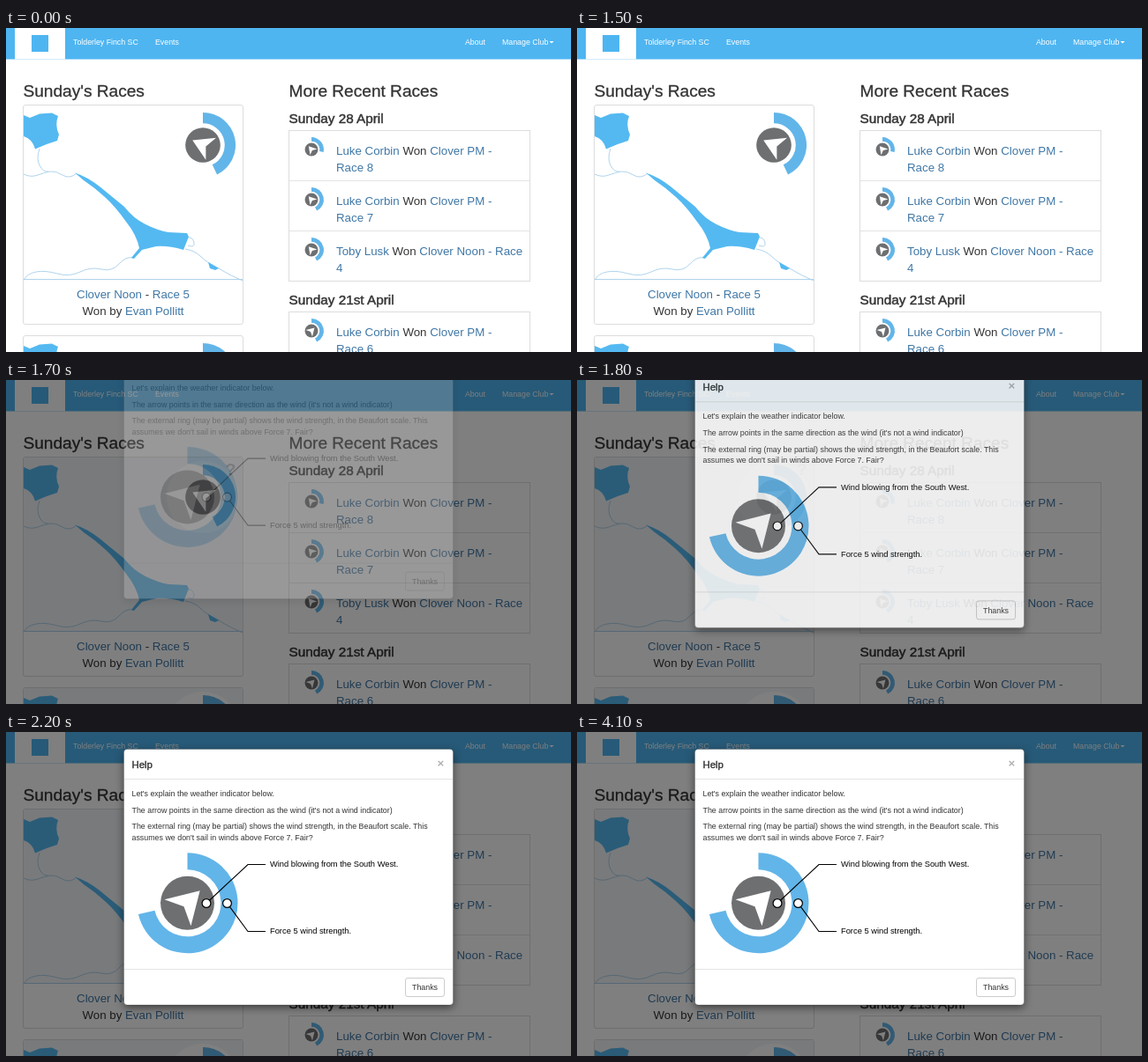
Recreate the animation shown at these times as an HTML page. Size 640 px wide and 368 px high, loop 4200 ms.

```html
<!DOCTYPE html>
<html lang="en">
<head>
<meta charset="utf-8">
<title>Weather indicator help</title>
<style>
  html, body { margin: 0; width: 100%; height: 100%; overflow: hidden; background: #fff; }
  svg { display: block; width: 640px; height: 368px; font: 13.3px "Liberation Sans", Arial, sans-serif; fill: #333; }
  .nav { font-size: 8.8px; fill: #fff; }
  .h2, .h3, .title { stroke: #333; stroke-width: .3; }
  .h2 { font-size: 19.1px; }
  .h3 { font-size: 15.3px; stroke-width: .45; }
  .title { font-size: 11.4px; stroke-width: .4; }
  .link { fill: #3f77a6; }
  .mid { text-anchor: middle; }
  .box { fill: #fff; stroke: #ddd; }
  .rule { stroke: #e4e4e4; fill: none; }
  .small { font-size: 8.87px; }
  .note { font-size: 9.32px; fill: #000; }
  .pointer { fill: none; stroke: #000; stroke-width: 1.1; }
  .dot { fill: #fff; stroke: #000; stroke-width: 1.2; }
  .water { fill: #54b9f1; }
  .coast { fill: none; stroke: #a6cfea; stroke-width: .9; }
  .sheet { fill: #fff; stroke: #000; stroke-opacity: .2; filter: drop-shadow(0 3.2px 4.7px rgba(0, 0, 0, .5)); }
</style>
</head>
<body>
<svg id="stage" viewBox="0 0 640 368" xmlns="http://www.w3.org/2000/svg"></svg>
<script>
const LOOP = 4200;
const DIM_START = 1524, FADE = 150;
const HELP_START = 1672, SLIDE = 300, LIFT = 72.7;

const text = (x, y, cls, str) => `<text x="${x}" y="${y}" class="${cls}">${str}</text>`;
const line = (cls, d) => `<path class="${cls}" d="${d}"/>`;

// Wind indicator: ring length shows force out of 7, arrow shows heading in degrees.
function indicator(x, y, scale, force, heading) {
  const a = force / 7 * 2 * Math.PI;
  const at = r => `${(r * Math.sin(a)).toFixed(2)} ${(-r * Math.cos(a)).toFixed(2)}`;
  const large = a > Math.PI ? 1 : 0;
  return `<g transform="translate(${x} ${y}) scale(${scale})">
    <path fill="#62b5e9" d="M0-57A57 57 0 ${large} 1 ${at(57)}L${at(38)}A38 38 0 ${large} 0 0-38Z"/>
    <circle r="30.5" fill="#6e6f71"/>
    <path fill="#fff" transform="rotate(${heading})" d="M0-20L21.2 15.6L0 5.7L-21.2 15.6Z"/>
  </g>`;
}

function card(dy) {
  return `<g transform="translate(0 ${dy})">
    <rect class="box" x="19.5" y="87.5" width="249" height="249" rx="2.5"/>
    <g class="tint" visibility="hidden">
      <rect x="20" y="88" width="248" height="198" fill="#f3f6f9"/>
      <circle cx="223" cy="133" r="41" fill="#fff"/>
    </g>
    ${line("coast", `M38 137Q34 148 38 156T48 163M20 166Q28 170 36 167T50 163T64 167T80 165
      M20 286Q24 279 34 277T58 279T84 277T108 274T128 268T144 261
      M203 251Q214 253 220 259T232 268T246 276T268 287M206 247Q214 250 213 244T207 238M20 285.5H268`)}
    ${line("water", `M20 99L27 102L38 97.500L52 96.500L59 100Q55 110 60 121L58 128L46 132L33 137.500
      Q30 126 20 123Z`)}
    ${line("water", `M78 164.500Q92 169 106 180L134 203Q144 216 158 223Q172 230 184 232L205 233
      L207 237L201 252Q184 247 170 248L154 252L145 262L142 261L151 250
      Q148 235 136 220Q124 203 112 192T88 173Z`)}
    ${line("water", "M229 266L241 273L237 275L231 273Z")}
    ${indicator(223, 133, .65, 3, -65)}
  </g>`;
}

function row(y, force, heading, winner, race, rest) {
  return indicator(346, y + 21.5, .245, force, heading) +
    text(374, y + 27.5, "link", `${winner} <tspan fill="#333">Won</tspan> ${race}`) +
    text(374, y + 46.5, "link", rest);
}

const page = `
  <rect width="640" height="368" fill="#fff"/>
  <rect width="640" height="35.5" fill="#4eb5f1"/>
  <rect x="10" width="57" height="35.500" fill="#fff"/>
  <rect x="29" y="8" width="19" height="19" fill="#4eb5f1"/>
  ${text(76, 19, "nav", "Tolderley Finch SC")}
  ${text(169, 19, "nav", "Events")}
  ${text(520, 19, "nav", "About")}
  ${text(562, 19, "nav", "Manage Club")}
  <path fill="#fff" d="M615.500 15H620.500L618 17.500Z"/>
  ${text(19.5, 77.5, "h2", "Sunday's Races")}
  ${card(0)}
  <text class="tint mid" visibility="hidden" x="254.500" y="108" font-size="19" fill="#b4b8bb" font-weight="bold">?</text>
  ${text(144, 306.5, "link mid", 'Clover Noon <tspan fill="#333">-</tspan> Race 5')}
  ${text(144, 325.5, "mid", 'Won by <tspan class="link">Evan Pollitt</tspan>')}
  ${card(262)}
  ${text(320.5, 77.5, "h2", "More Recent Races")}
  ${text(320.5, 107.5, "h3", "Sunday 28 April")}
  <rect class="box" x="320.500" y="116.500" width="273" height="171"/>
  ${line("rule", "M321 173.5H593M321 230.5H593")}
  ${row(116.5, 2, -40, "Luke Corbin", "Clover PM -", "Race 8")}
  ${row(173.5, 3, -40, "Luke Corbin", "Clover PM -", "Race 7")}
  ${row(230.5, 3, -40, "Toby Lusk", "Clover Noon - Race", "4")}
  ${text(320.5, 313.5, "h3", "Sunday 21st April")}
  <rect class="box" x="320.500" y="322.500" width="273" height="171"/>
  ${row(322.5, 3, 45, "Luke Corbin", "Clover PM -", "Race 6")}`;

const help = `
  <rect class="sheet" x="133.500" y="19.500" width="373" height="290.500" rx="4"/>
  ${line("rule", "M134 53.5H506M134 269.5H506")}
  ${text(142.5, 40.5, "title", "Help")}
  <text class="mid" x="492.500" y="39.500" font-weight="bold" fill="#000" opacity=".3">×</text>
  <g class="small">
    ${text(142.5, 73, "", "Let's explain the weather indicator below.")}
    ${text(142.5, 92, "", "The arrow points in the same direction as the wind (it's not a wind indicator)")}
    ${text(142.5, 110.3, "", "The external ring (may be partial) shows the wind strength, in the Beaufort scale. This")}
    ${text(142.5, 123, "", "assumes we don't sail in winds above Force 7. Fair?")}
    <rect x="452.500" y="279.500" width="44" height="21" rx="2.500" fill="#fff" stroke="#ccc"/>
    ${text(474.5, 293.2, "mid", "Thanks")}
  </g>
  ${indicator(205.5, 194.3, 1, 5, 45)}
  ${line("pointer", "M227 194.5L274 150.5H294M250.5 194.5L274 226.5H294")}
  <circle class="dot" cx="227" cy="194.500" r="4.900"/>
  <circle class="dot" cx="250.500" cy="194.500" r="4.900"/>
  ${text(299, 153.4, "note", "Wind blowing from the South West.")}
  ${text(299, 229.4, "note", "Force 5 wind strength.")}`;

const stage = document.getElementById("stage");
stage.innerHTML = `${page}
  <rect id="dim" width="640" height="368" fill="#000" opacity="0"/>
  <g id="help" opacity="0">${help}</g>`;

const dimEl = document.getElementById("dim");
const helpEl = document.getElementById("help");
const tints = stage.querySelectorAll(".tint");
const progress = (t, start, length) => Math.min(1, Math.max(0, (t - start) / length));

// cubic-bezier(0, 0, .58, 1)
function easeOut(x) {
  let lo = 0, hi = 1;
  for (let i = 0; i < 24; i++) {
    const s = (lo + hi) / 2;
    if (s * s * (1.74 - .74 * s) < x) lo = s; else hi = s;
  }
  return lo * lo * (3 - 2 * lo);
}

function draw(t) {
  const dim = progress(t, DIM_START, FADE);
  const slide = easeOut(progress(t, HELP_START, SLIDE));
  dimEl.setAttribute("opacity", dim * .5);
  tints.forEach(el => el.setAttribute("visibility", dim > 0 ? "visible" : "hidden"));
  helpEl.setAttribute("opacity", progress(t, HELP_START, FADE));
  helpEl.setAttribute("transform", `translate(0 ${(-LIFT * (1 - slide)).toFixed(3)})`);
}

function tick() {
  draw(performance.now() % LOOP);
  requestAnimationFrame(tick);
}
tick();
</script>
</body>
</html>
```
